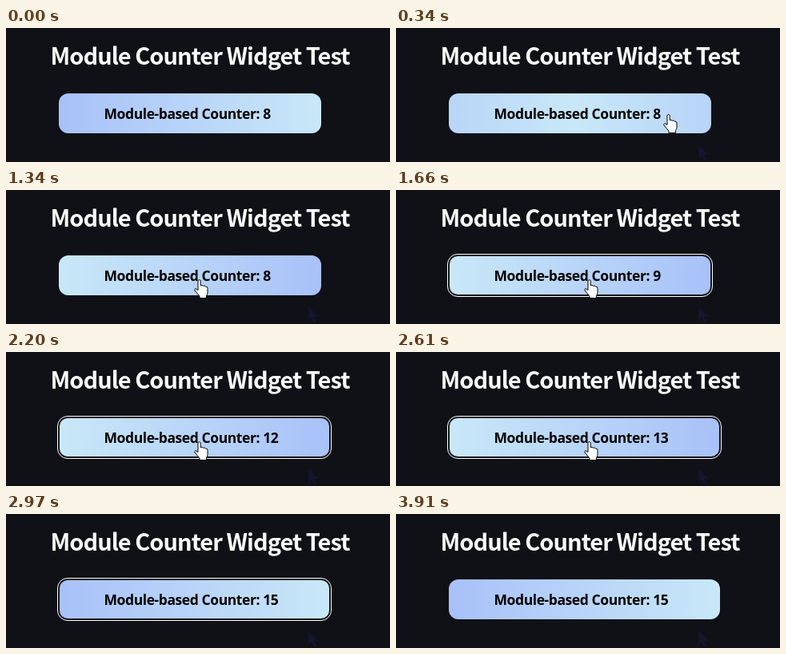
These frames come from a looping animation (480x168 px, 3990 ms). An HTML page:

```html
<!DOCTYPE html>
<html lang="en">
<head>
<meta charset="utf-8">
<title>Counter widget</title>
<style>
html, body { margin: 0; width: 100%; height: 100%; overflow: hidden; background: #0f1116; }
svg { display: block; width: 480px; height: 168px; }
.title { font: 700 29px "Noto Sans CJK JP", "Noto Sans CJK SC", "Noto Sans CJK", sans-serif; letter-spacing: -.97px; fill: #fafafa; }
.label { font: 700 17.5px "Open Sans", "Noto Sans", sans-serif; letter-spacing: -.42px; fill: #000; }
</style>
</head>
<body>
<svg viewBox="0 0 480 168">
  <defs>
    <linearGradient id="sheen" gradientUnits="userSpaceOnUse">
      <stop offset="0" stop-color="#a8c1f8"/>
      <stop offset=".5" stop-color="#c8e8f8"/>
      <stop offset="1" stop-color="#a8c1f8"/>
    </linearGradient>
    <path id="arrow" d="M0 0V18L4 14L7 20.500L10 19.300L7.200 13H12.800Z"/>
  </defs>
  <rect width="480" height="168" fill="#0f1116"/>
  <text class="title" x="55.5" y="46">Module Counter Widget Test</text>
  <rect id="button" x="66" y="82" height="50" rx="12" fill="url(#sheen)"/>
  <g id="ring" fill="none">
    <rect class="fit" data-grow="0" x="66" y="82" height="50" rx="11" stroke="#101116" stroke-width="2"/>
    <rect class="fit" data-grow="3" x="64.5" y="80.5" height="53" rx="12.5" stroke="#fff"/>
  </g>
  <text class="label" id="label" x="122.5" y="113.5"></text>
  <use id="trail" href="#arrow" x="378" y="146" fill="#15152e"/>
  <use id="exit" href="#arrow" x="240" y="138" fill="#15152e"/>
  <path id="hand" fill="#fff" stroke="#000" stroke-linejoin="round"
    d="M5 13.500V2.200a1.600 1.600 0 0 1 3.200 0V7.600q1.800-1 3.200 .6q1.900-.8 3.200 .9q2.400-.3 2.400 2V16.500q0 2.200-1.600 4.200V23.500H7V21.200L1 14q-.8-1.700 .6-2.200q1.300-.3 3.400 1.700Z"/>
</svg>
<script>
const LOOP = 3990, ENTER = 200, FOCUS = 1530, LEAVE = 2700, BLUR = 3910, SLIDE = 270;
const clicks = [1530, 1860, 2000, 2130, 2340, 2660, 2800];
// time, x, y of the hand
const path = [[270, 352, 112], [340, 334, 108], [400, 316, 106], [1070, 288, 109],
  [1200, 268, 110], [1270, 248, 111], [1340, 235, 112]];

const el = id => document.getElementById(id);
const clamp = v => Math.max(0, Math.min(1, v));
const show = (id, on) => el(id).setAttribute("visibility", on ? "visible" : "hidden");

function draw(t) {
  const count = 8 + clicks.filter(c => t >= c).length;
  const width = count < 10 ? 328 : 339;
  const slide = clamp((t - ENTER) / SLIDE) - clamp((t - LEAVE) / SLIDE);
  const left = 66 - slide * width;

  el("label").textContent = "Module-based Counter: " + count;
  el("button").setAttribute("width", width);
  for (const r of document.querySelectorAll(".fit"))
    r.setAttribute("width", width + Number(r.dataset.grow));
  el("sheen").setAttribute("x1", left);
  el("sheen").setAttribute("x2", left + 2 * width);

  show("ring", t >= FOCUS && t < BLUR);
  show("trail", t >= ENTER);
  show("exit", t >= LEAVE && t < LEAVE + 100);

  const pose = path.filter(p => t >= p[0]).pop();
  show("hand", pose && t < LEAVE);
  if (pose) el("hand").setAttribute("transform", `translate(${pose[1]} ${pose[2]})`);
}

function tick(now) {
  draw(now % LOOP);
  requestAnimationFrame(tick);
}
draw(0);
requestAnimationFrame(tick);
</script>
</body>
</html>
```
